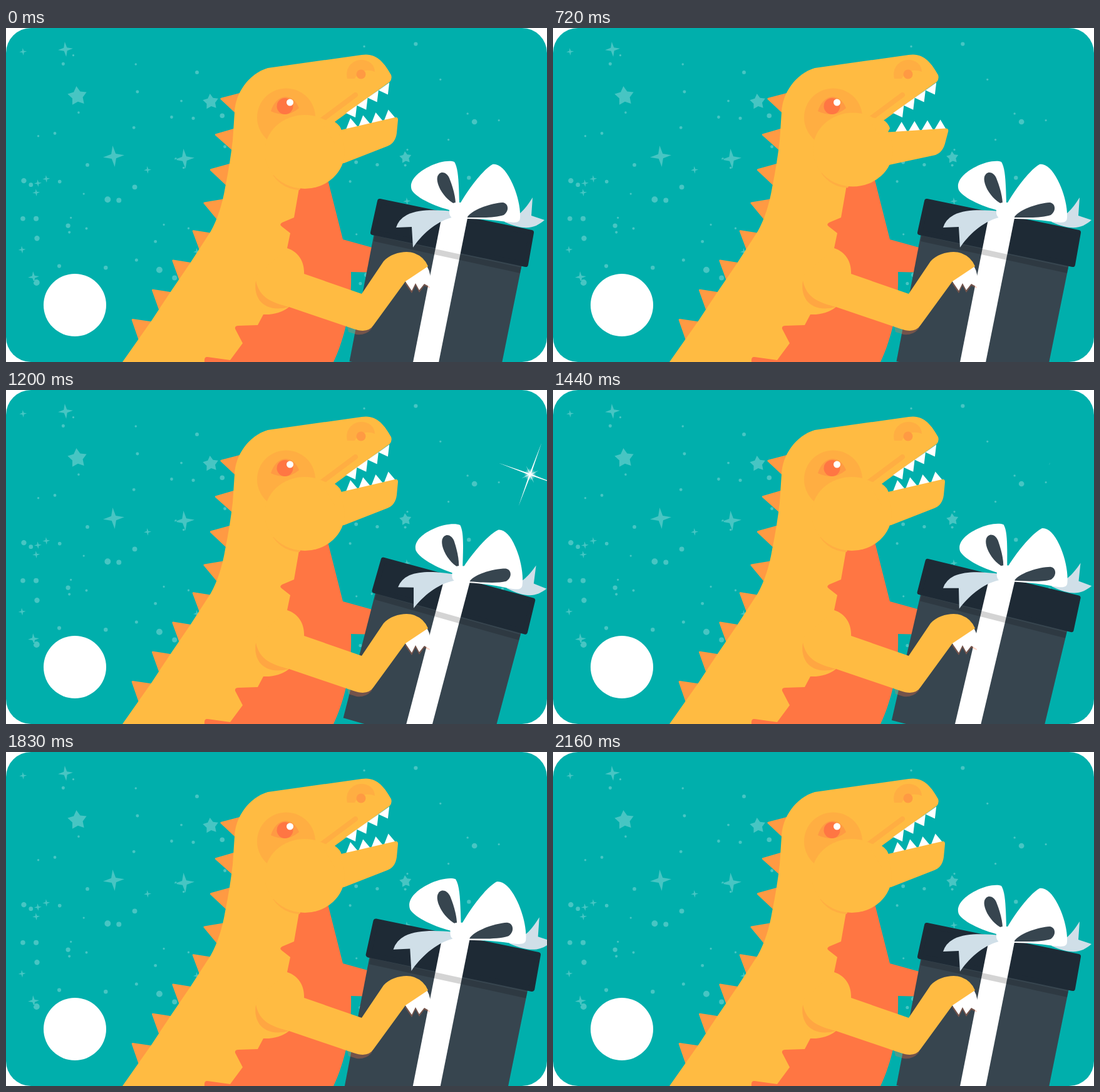
Write an HTML page that moves like this. It is 864 px wide and 534 px high and loops after 3.16 s.

```html
<!DOCTYPE html>
<html lang="en">
<head>
<meta charset="utf-8">
<title>Dinosaur with a gift</title>
<style>
  html, body { margin: 0; width: 100%; height: 100%; overflow: hidden; background: #fff; }
  svg { display: block; width: 100vw; height: 100vh; }
  .yellow { fill: #ffbb42; }
  .shade { fill: #ffae42; }
  .orange { fill: #ff9a43; }
  .red { fill: #ff7643; }
  .white { fill: #fff; }
  .slate { fill: #37454f; }
  .tail { fill: #d0dfe8; }
</style>
</head>
<body>
<svg viewBox="0 0 864 534">
  <defs>
    <clipPath id="card"><rect width="864" height="534" rx="40"/></clipPath>
    <radialGradient id="glow">
      <stop offset="0" stop-color="#fff"/>
      <stop offset=".3" stop-color="#fff" stop-opacity=".7"/>
      <stop offset="1" stop-color="#fff" stop-opacity="0"/>
    </radialGradient>
    <g id="glint">
      <path class="white" d="M0-72L1.6-1.6L72 0L1.6 1.6L0 72L-1.6 1.6L-72 0L-1.6-1.6Z"/>
      <path class="white" opacity=".7" d="M-14-14L1-2L14-14L2 1L14 14L-1 2L-14 14L-2-1Z"/>
      <circle r="13" fill="url(#glow)"/>
    </g>
  </defs>
  <g clip-path="url(#card)">
    <rect width="864" height="534" fill="#00afac"/>
    <path id="sky" class="white" opacity=".28"/>
    <circle class="white" cx="110" cy="443" r="50"/>

    <path id="spine" fill="none" d="M372 121C356 215 353 290 322 340L222 484"/>
    <path id="spikes" class="orange" stroke="#ff9a43" stroke-width="3" stroke-linejoin="round"/>
    <path class="yellow" d="M186 534L233 467L262 423L294 376L327 325Q343 296 350 255Q358 215 362 180L365 135C366 104 388 73 418 64L568 43C591 39 604 55 615 75Q617 81 613 86L525 150L500 165L470 250L440 534Z"/>
    <path class="red" d="M472 235H512L515 247L538 338L592 353V391L551 390C552 430 548 480 523 534H317Q316 525 322 526L358 531L378 504L366 481Q365 476 371 476L402 475L411 458L454 440V362L449 352L454 328L440 317Q436 314 441 311L460 303L468 257Z"/>

    <circle class="shade" cx="447.500" cy="143" r="46.500"/>
    <path class="orange" d="M423 133Q430 111 447 110Q461 111 468 128Q456 138 445 138Q433 138 423 133Z"/>
    <circle class="red" cx="445.500" cy="125" r="13"/>
    <circle class="white" cx="453.500" cy="119" r="5.500"/>
    <path class="shade" d="M545 81C541 63 554 51 567 51C580 51 589 59 589 70C577 65 563 68 557 81Z"/>
    <circle class="orange" cx="567" cy="74" r="7.500"/>
    <path d="M503 148L558 107" stroke="#ffae42" stroke-width="8" stroke-linecap="round"/>
    <path id="upperTeeth" class="white"/>

    <g id="jaw">
      <path id="lowerTeeth" class="white"/>
      <path class="yellow" d="M515 167L535 163L621 143Q626 142 626 147L624 168Q622 184 609 189L540 216L505 222Z"/>
    </g>
    <g id="cheek">
      <path class="shade" d="M426 235Q442 258 469 259L475 245Z"/>
      <ellipse class="yellow" cx="477" cy="198" rx="64" ry="59"/>
      <path class="yellow" d="M500 145L525 150Q534 156 536 164L525 185Z"/>
    </g>

    <g id="gift">
      <path class="slate" d="M588 328L823.500 380L782 585L548.500 533Z"/>
      <path fill="#1e2a35" stroke="#1e2a35" stroke-width="8" stroke-linejoin="round" d="M597 277L839 327L830 378L586 327Z"/>
      <path class="white" d="M697 296L737 304L681 585L642 575Z"/>
      <path opacity=".17" d="M589 332L823 383L821 392L587 341Z"/>
      <path class="tail" d="M712 293C690 291 660 289 640 299Q627 306 623 319L648 318L650 351C663 332 685 310 712 303Z"/>
      <path class="tail" d="M800 305C815 305 828 292 841 271L839 300L860 307C845 320 830 325 796 310Z"/>
      <path class="white" d="M718 293C690 288 655 272 648 259C643 246 655 232 675 222C690 214 708 211 716 214C723 225 723 250 724 280Z"/>
      <path class="white" d="M724 283C738 258 760 228 777 218C786 216 797 225 806 243C815 260 822 285 821 303C821 311 815 312 800 310C775 306 750 305 730 305Z"/>
      <path class="slate" d="M718 282C700 274 686 250 689 238C692 228 703 229 708 240C714 255 718 270 718 282Z"/>
      <path class="slate" d="M737 302C745 290 775 280 793 279C803 280 804 293 795 299C780 304 755 303 737 303Z"/>
      <rect class="white" x="708" y="279" width="29" height="27" rx="11"/>
    </g>

    <g fill="#ff7643" opacity=".3">
      <path d="M545 478L590 468L583 482Q573 492 560 490L547 486Z"/>
      <path d="M637 408L672 385L677 416L668 412L660 423L654 412L648 424Z"/>
    </g>
    <path class="white" d="M637 404L672 380Q681 396 677 414L668 409L660 419L654 408L648 420Z"/>
    <path class="yellow" d="M449 352C468 358 477 375 476 393L568 425L603 373C615 359 640 355 652 360Q668 366 674 381L638 405L587 475Q578 489 555 481L452 446Q436 459 411 458L395 400Z"/>
    <path fill="#ffa642" d="M399 404C394 435 415 456 452 446C425 439 405 432 399 404Z"/>
    <use id="glintA" href="#glint"/>
    <use id="glintB" href="#glint"/>
  </g>
</svg>
<script>
const $ = id => document.getElementById(id);
const LOOP = 3160, STEP = 30, LAST = 2160;
const setPath = (id, d) => $(id).setAttribute("d", d);
const move = (id, value) => $(id).setAttribute("transform", value);

// Small seeded generator, so the sky is the same on every load.
let seed = 11;
const random = () => (seed = (seed * 16807) % 2147483647) / 2147483647;
for (let i = 0; i < 5; i++) random();

const dot = (x, y, r) => `M${x - r} ${y}a${r} ${r} 0 1 0 ${2 * r} 0a${r} ${r} 0 1 0 ${-2 * r} 0Z`;

function star(x, y, r, points) {
  const inner = points === 4 ? 0.3 : 0.55;
  let d = "";
  for (let i = 0; i < points * 2; i++) {
    const angle = i * Math.PI / points - Math.PI / 2 - 0.1;
    const k = i % 2 ? r * inner : r;
    d += `${i ? "L" : "M"}${x + k * Math.cos(angle)} ${y + k * Math.sin(angle)}`;
  }
  return d + "Z";
}

// Big stars have fixed places; the rest thin out towards the right.
function sky() {
  let d = star(95, 34, 12, 4) + star(172, 205, 17, 4) + star(285, 209, 16, 4) + star(44, 398, 9, 4) +
    star(114, 109, 16, 5) + star(327, 118, 13, 5) + star(638, 207, 10, 5);
  for (let i = 0; i < 80; i++) {
    const x = 25 + 770 * random() ** 1.5, y = 25 + 390 * random();
    d += i % 10 ? dot(x, y, 1.6 + 3.4 * random() ** 2) : star(x, y, 6, 4);
  }
  return d;
}

// Equal triangles at equal steps along the spine, each pointing outwards.
function spikes(count) {
  const spine = $("spine"), gap = spine.getTotalLength() / (count - 1);
  let d = "";
  for (let i = 0; i < count; i++) {
    const p = spine.getPointAtLength(i * gap);
    const a = spine.getPointAtLength(i * gap - 1), b = spine.getPointAtLength(i * gap + 1);
    const length = Math.hypot(b.x - a.x, b.y - a.y);
    const tx = (b.x - a.x) / length, ty = (b.y - a.y) / length;
    const at = (along, out) => `${p.x + along * tx - out * ty} ${p.y + along * ty + out * tx}`;
    d += `M${at(-3, 29 - i * 0.4)}L${at(-16, 0)}L${at(0, -10)}L${at(16, 0)}Z`;
  }
  return d;
}

function teeth(x, y, dx, dy, tipX, tipY, width) {
  let d = "";
  for (let i = 0; i < 4; i++)
    d += `M${x + i * dx} ${y + i * dy}l${tipX} ${tipY}L${x + (i + width) * dx} ${y + (i + width) * dy}Z`;
  return d;
}

setPath("sky", sky());
setPath("spikes", spikes(8));
setPath("upperTeeth", teeth(543, 136, 17.3, -12.2, 15, 7, 1));
setPath("lowerTeeth", teeth(543, 162, 20.2, -4.5, 7, -18, 0.92));

const clamp = u => Math.min(1, Math.max(0, u));
const span = (t, from, to) => clamp((t - from) / (to - from));
const ease = u => (1 - Math.cos(Math.PI * u)) / 2;
// Eased rise to 1 at peak, then eased fall to 0 at end.
const swell = (t, start, peak, end) =>
  t < peak ? ease(span(t, start, peak)) : 1 - ease(span(t, peak, end));

function glint(id, x, y, size, t, start) {
  const life = 360;
  const scale = size * swell(t, start, start + life / 2, start + life);
  const turn = 10 + 30 * span(t, start, start + life);
  move(id, `translate(${x} ${y}) rotate(${turn}) scale(${scale})`);
  $(id).style.display = scale > 0.001 ? "" : "none";
}

function draw(t) {
  const open = swell(t, 0, 495, 990);
  move("jaw", `rotate(${16.3 * open} 517 188)`);
  move("cheek", `translate(${3.5 * open} ${-6 * open})`);

  const tilt = 4.5 * swell(t, 1080, 1255, 1605);
  const drift = -1.8 * Math.sin(Math.PI * span(t, 1255, 1605));
  const scale = 1 + 0.078 * swell(t, 1640, 1880, 2160);
  move("gift", `translate(${687 + drift} 367) rotate(${tilt}) scale(${scale}) translate(-687 -367)`);

  glint("glintA", 837, 135, 1, t, 1080);
  glint("glintB", 793, 118, 0.62, t, 1410);
}

const begin = performance.now();
function tick() {
  const t = (performance.now() - begin) % LOOP;
  draw(Math.min(LAST, Math.floor(t / STEP) * STEP));
  requestAnimationFrame(tick);
}
tick();
</script>
</body>
</html>
```
